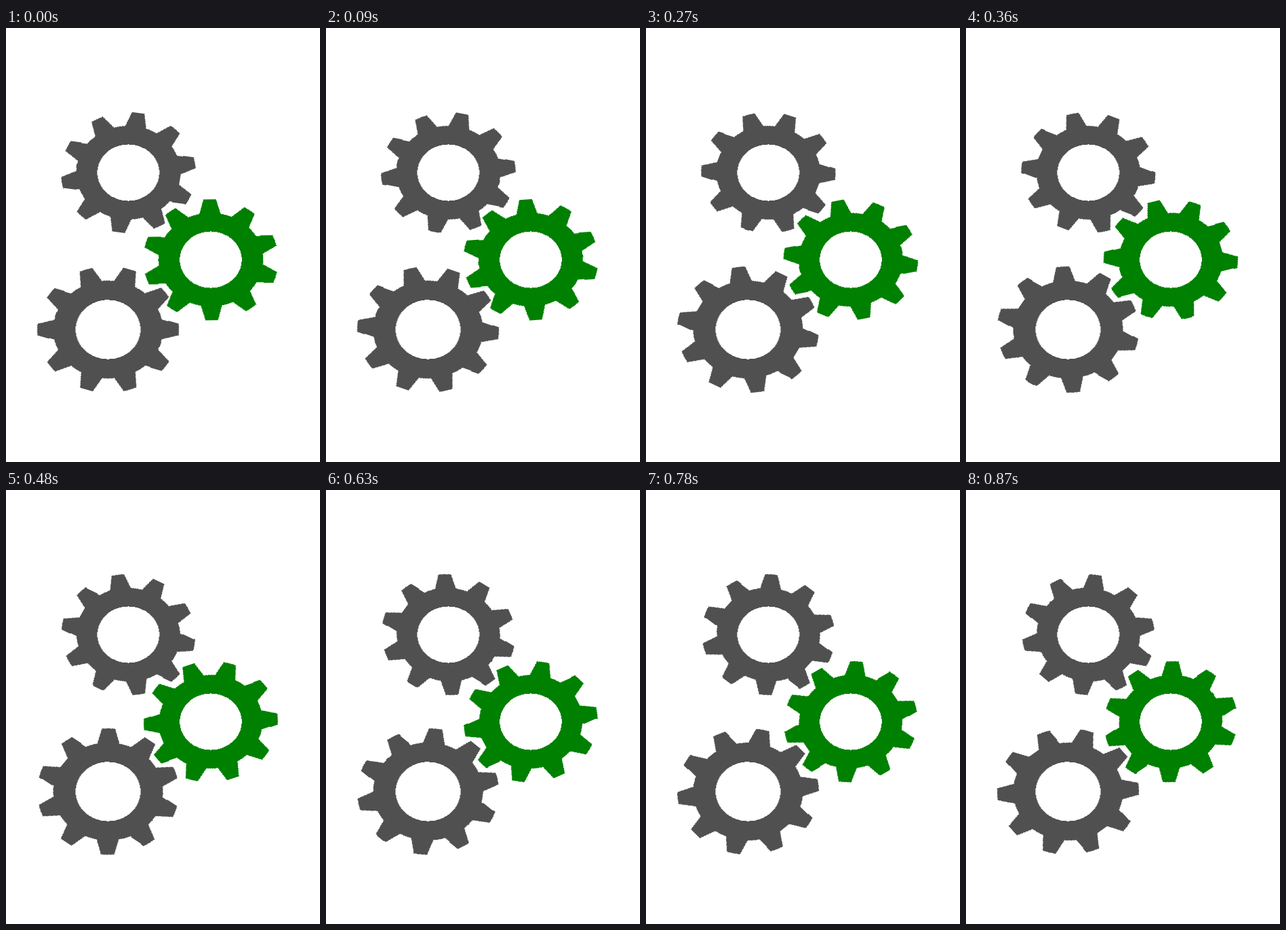
These frames come from a looping animation (463 px wide and 639 px high, 900 ms). An HTML page without scripts:

```html
<!DOCTYPE html>
<html lang="en">
<head>
<meta charset="utf-8">
<title>Turning gears</title>
<style>
  html, body {
    margin: 0;
    width: 100%;
    height: 100%;
    overflow: hidden;
    background: #fff;
  }
  svg { display: block; }
  .wheel {
    --turn: calc(30 * 36deg / 31);
    transform-origin: 0 0;
    animation: turn 900ms steps(30, end) infinite;
  }
  .hole { fill: #fff; }
  /* The wheel leans and narrows slightly while it turns */
  @keyframes turn {
    from { transform: scaleX(1) skewY(0deg) rotate(var(--start)); }
    to {
      transform: scaleX(var(--narrow)) skewY(var(--lean))
                 rotate(calc(var(--start) + var(--dir) * var(--turn)));
    }
  }
</style>
</head>
<body>
<svg width="463" height="639" viewBox="0 0 463 639" shape-rendering="crispEdges">
  <defs>
    <path id="tooth" d="M-15.6-75.9L-9.4-99.6A100 100 0 0 1 9.4-99.6L15.6-75.9L0-55Z"/>
    <g id="pair">
      <use href="#tooth"/>
      <use href="#tooth" transform="rotate(180)"/>
    </g>
    <!-- Ten-tooth gear of radius 100 -->
    <g id="gear">
      <circle r="77.5"/>
      <use href="#pair"/>
      <use href="#pair" transform="rotate(36)"/>
      <use href="#pair" transform="rotate(72)"/>
      <use href="#pair" transform="rotate(108)"/>
      <use href="#pair" transform="rotate(144)"/>
    </g>
  </defs>

  <g transform="translate(180.4 213)" fill="#505050">
    <g transform="scale(.995 .89)">
      <g class="wheel" style="--start: 8.4deg; --dir: 1; --lean: 2deg; --narrow: .985"><use href="#gear"/></g>
    </g>
    <ellipse class="hole" rx="45.7" ry="41.6"/>
  </g>

  <g transform="translate(150.5 444)" fill="#505050">
    <g transform="scale(1.045 .93)">
      <g class="wheel" style="--start: 17.8deg; --dir: 1; --lean: 0deg; --narrow: 1"><use href="#gear"/></g>
    </g>
    <ellipse class="hole" rx="47.8" ry="43.7"/>
  </g>

  <g transform="translate(301.9 341.2)" fill="#008000">
    <g transform="scale(.997 .89)">
      <g class="wheel" style="--start: -.85deg; --dir: -1; --lean: -2deg; --narrow: .985"><use href="#gear"/></g>
    </g>
    <ellipse class="hole" rx="45.7" ry="41.6"/>
  </g>
</svg>
</body>
</html>
```
